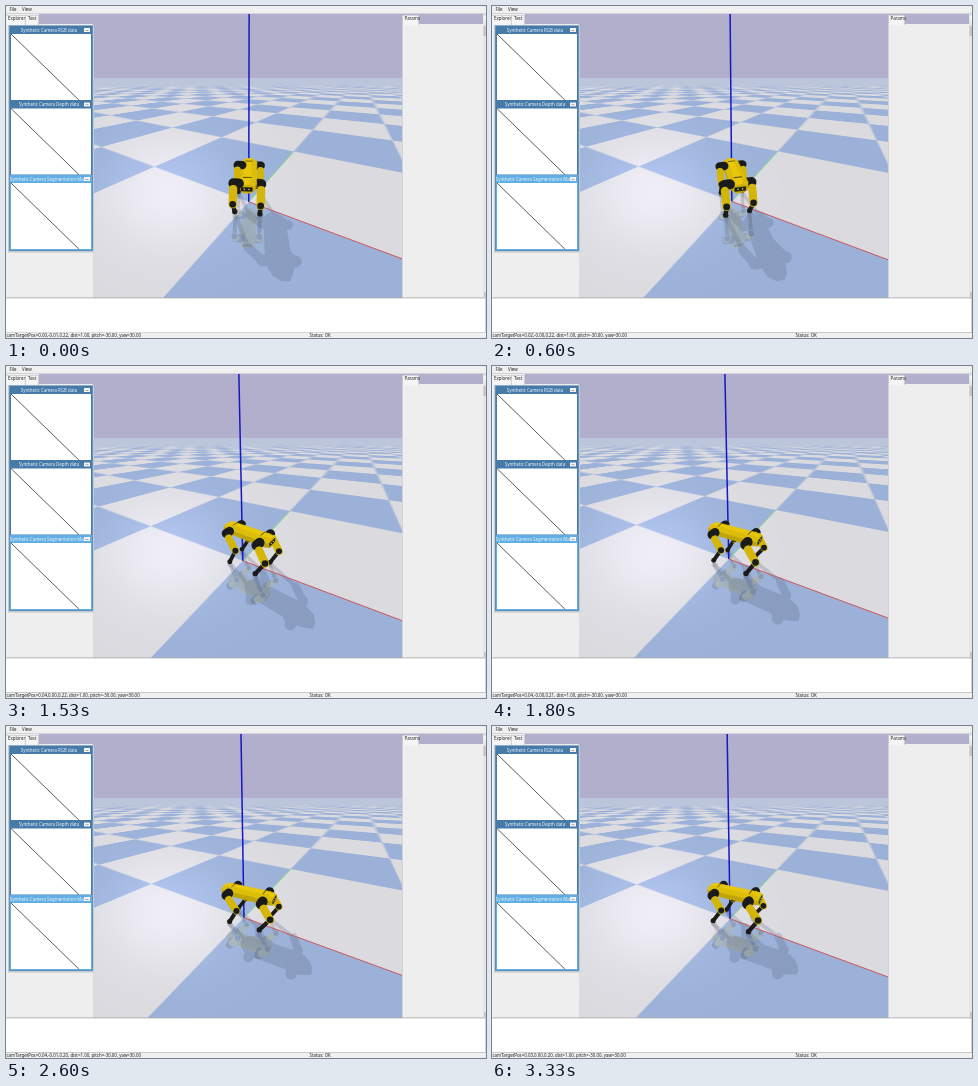
An HTML page with a canvas for the animation above (3390 ms loop, 480 by 332 pixels).

```html
<!DOCTYPE html>
<html lang="en">
<head>
<meta charset="utf-8">
<title>Quadruped simulation</title>
<style>
  html, body { margin: 0; width: 480px; height: 332px; overflow: hidden; background: #f0f0f0; }
  canvas { display: block; }
</style>
</head>
<body>
<canvas id="stage" width="480" height="332"></canvas>
<script>
const stage = document.getElementById('stage');
const ctx = stage.getContext('2d');
const LOOP = 3390;
const VIEW = { x: 87, y: 8, w: 309, h: 284 };
const HORIZON = 72;
const FOCAL = 168.5, CX = 242.3, CY = 167.6;
const COS = Math.cos(Math.PI / 6), SIN = 0.5;
const BLACK = '#1b1b1a';

// time, camera target x, y, z, heading in degrees
const KEYS = [
  [0, 0.001, -0.008, 0.22, -3],
  [600, 0.02, -0.002, 0.22, 11],
  [1130, 0.03, 0.003, 0.22, 42],
  [1530, 0.041, 0.003, 0.22, 54],
  [2070, 0.047, -0.007, 0.2, 68],
  [2600, 0.038, -0.008, 0.2, 65],
  [3330, 0.031, 0.002, 0.2, 66]
];

function poseAt(t) {
  let i = 0;
  while (i < KEYS.length - 2 && t >= KEYS[i + 1][0]) i++;
  const a = KEYS[i], b = KEYS[i + 1];
  const k = Math.min(1, (t - a[0]) / (b[0] - a[0]));
  const [, x, y, z, deg] = a.map((v, n) => v + (b[n] - v) * k);
  return { x, y, z, heading: deg * Math.PI / 180, t };
}

// Ground coordinates relative to the camera target: right, forward, height.
function project(pose, r, f, z) {
  const dz = z - pose.z;
  const depth = 1 + f * COS - dz * SIN;
  const scale = FOCAL / depth;
  return [CX + r * scale, CY + (-dz * COS - f * SIN) * scale, scale];
}

function projectWorld(pose, x, y, z) {
  const dx = x - pose.x, dy = y - pose.y;
  return project(pose, dx * COS + dy * SIN, dy * COS - dx * SIN, z);
}

const floorImage = ctx.createImageData(VIEW.w, VIEW.y + VIEW.h - HORIZON);

// Box-filtered square wave of period 2
function wave(p, w) {
  const tri = v => Math.abs(v / 2 - Math.floor(v / 2) - 0.5);
  return 2 * (tri(p - w / 2) - tri(p + w / 2)) / w;
}

function drawFloor(pose) {
  const { data, width, height } = floorImage;
  let o = 0;
  for (let j = 0; j < height; j++) {
    const py = HORIZON + j + 0.5;
    const v = (py - CY) / FOCAL;
    const drop = Math.max(0.004, SIN + v * COS);
    const depth = (pose.z + 0.5) / drop;
    const f = depth * (COS - SIN * v) - COS;
    const wr = depth / FOCAL, wf = wr / drop;
    const wx = COS * wr + SIN * wf, wy = SIN * wr + COS * wf;
    for (let i = 0; i < width; i++) {
      const px = VIEW.x + i + 0.5;
      const r = (px - CX) / FOCAL * depth;
      const x = pose.x + r * COS - f * SIN;
      const y = pose.y + r * SIN + f * COS;
      const white = 0.5 + 0.5 * wave(x, wx) * wave(y, wy);
      const glow = Math.exp(-(((px - 162) / 66) ** 2) - ((py - 186) / 56) ** 2);
      data[o++] = 156 + 62 * white + 21 * glow;
      data[o++] = 177 + 41 * white + 20 * glow;
      data[o++] = 215 + 8 * white + 24 * glow;
      data[o++] = 255;
    }
  }
  ctx.putImageData(floorImage, VIEW.x, HORIZON);
}

function drawAxis(pose, end, color, width) {
  const a = projectWorld(pose, 0, 0, 0), b = projectWorld(pose, ...end);
  ctx.strokeStyle = color;
  ctx.lineWidth = width;
  ctx.beginPath();
  ctx.moveTo(a[0], a[1]);
  ctx.lineTo(b[0], b[1]);
  ctx.stroke();
}

const yellow = k => `rgb(${240 * k | 0},${207 * k | 0},${10 * k | 0})`;

// along, half width, half height of the body sections
const SECTIONS = [[-0.162, 0.036, 0.022], [-0.135, 0.05, 0.033], [0.125, 0.05, 0.033], [0.16, 0.04, 0.025]];

// map turns (right, forward, height) into a screen point; facing is the culling sign, 0 for none.
function drawRobot(g, pose, map, facing, flat) {
  const s = Math.sin(pose.heading), c = Math.cos(pose.heading);
  const at = (a, b, z) => map(a * s - b * c, -a * c - b * s, z);

  function polygon(points, color) {
    let area = 0;
    points.forEach((p, i) => {
      const q = points[(i + 1) % points.length];
      area += p[0] * q[1] - p[1] * q[0];
    });
    if (facing && area * facing < 0) return;
    g.fillStyle = g.strokeStyle = flat || color;
    g.lineWidth = 0.5;
    g.beginPath();
    points.forEach(p => g.lineTo(p[0], p[1]));
    g.closePath();
    g.fill();
    g.stroke();
  }

  function limb(p, q, size, color) {
    g.strokeStyle = flat || color;
    g.lineCap = 'round';
    g.lineWidth = size * (p[2] + q[2]) / 2;
    g.beginPath();
    g.moveTo(p[0], p[1]);
    g.lineTo(q[0] + 0.01, q[1]);
    g.stroke();
  }

  function leg(front, side) {
    const phase = pose.t / 530 * 2 * Math.PI + (front * side > 0 ? 0 : Math.PI);
    const stride = 0.012 * Math.sin(phase);
    const lift = Math.max(0, Math.cos(phase)) * 0.01;
    const a = front * 0.108, b = side * 0.075;
    const hip = at(a, b, pose.z);
    const thigh = at(a + 0.018, b, pose.z * 0.88);
    const knee = at(a + 0.062 + stride / 2, b, pose.z * 0.55 + lift / 2);
    const foot = at(a + 0.005 + stride, b, 0.01 + lift);
    limb(at(a, side * 0.045, pose.z), hip, 0.054, BLACK);
    limb(knee, foot, 0.024, BLACK);
    limb(foot, foot, 0.032, BLACK);
    limb(thigh, knee, 0.044, yellow(0.88));
    limb(knee, knee, 0.036, BLACK);
  }

  function body() {
    const rings = SECTIONS.map(([a, w, h]) => Array.from({ length: 8 }, (_, k) => {
      const angle = (k + 0.5) * Math.PI / 4;
      return at(a, 1.08 * w * Math.cos(angle), pose.z + 1.08 * h * Math.sin(angle));
    }));
    for (let n = 0; n < 3; n++) {
      for (let k = 0; k < 8; k++) {
        const m = (k + 1) % 8;
        const up = Math.sin((k + 1) * Math.PI / 4);
        polygon([rings[n][m], rings[n + 1][m], rings[n + 1][k], rings[n][k]], yellow(0.8 + 0.17 * up));
      }
    }
    polygon([...rings[0]].reverse(), yellow(0.7));
    polygon(rings[3], yellow(0.85));
    const panel = [[1, -1], [1, 1], [-1, 1], [-1, -1]];
    polygon(panel.map(([b, z]) => at(0.161, b * 0.029, pose.z + z * 0.011)), BLACK);
    if (c > 0.3) {
      for (const b of [-0.012, 0.012]) {
        const eye = at(0.162, b, pose.z);
        limb(eye, eye, 0.008, '#d8c254');
      }
    }
    // Dark seams on the top cover
    for (const a of [-0.1, 0.1]) {
      limb(at(a, -0.02, pose.z + 0.034), at(a, 0.02, pose.z + 0.034), 0.006, '#6d5c08');
    }
  }

  leg(-1, -1);
  leg(1, -1);
  body();
  leg(-1, 1);
  leg(1, 1);
}

const layer = document.createElement('canvas');
layer.width = 480;
layer.height = 332;
const layerCtx = layer.getContext('2d');

function drawGhost(alpha, pose, map, facing, flat) {
  layerCtx.clearRect(0, 0, 480, 332);
  drawRobot(layerCtx, pose, map, facing, flat);
  ctx.globalAlpha = alpha;
  ctx.drawImage(layer, 0, 0);
  ctx.globalAlpha = 1;
}

function drawScene(pose) {
  rect(33, 8, 363, 65, '#b1afcb');
  drawFloor(pose);
  ctx.save();
  ctx.beginPath();
  ctx.rect(VIEW.x, VIEW.y, VIEW.w, VIEW.h);
  ctx.clip();
  drawGhost(0.2, pose, (r, f, z) => project(pose, r + 0.65 * z, f - 1.35 * z, 0), 0, '#44526f');
  drawGhost(0.15, pose, (r, f, z) => project(pose, r, f, -z), -1);
  drawAxis(pose, [1, 0, 0], '#c85860', 1);
  drawAxis(pose, [0, 1, 0], '#78d882', 1);
  drawAxis(pose, [0, 0, 1], '#1717c4', 1.5);
  drawRobot(ctx, pose, (r, f, z) => project(pose, r, f, z), 1);
  ctx.restore();
}

function rect(x, y, w, h, color) {
  ctx.fillStyle = color;
  ctx.fillRect(x, y, w, h);
}

function text(string, x, y, color = '#222', align = 'left') {
  ctx.font = '4.4px "Noto Sans", sans-serif';
  ctx.textAlign = align;
  ctx.fillStyle = color;
  ctx.fillText(string, x, y);
}

function cameraWindow(y, title, header) {
  rect(4, y, 82, 75, header);
  rect(5, y + 8, 80, 66, '#fff');
  ctx.save();
  ctx.beginPath();
  ctx.rect(4, y, 74, 75);
  ctx.clip();
  text(title, 43, y + 5.6, '#eef5fb', 'center');
  ctx.restore();
  rect(78, y + 2, 6, 4, '#f4f4f4');
  rect(79.5, y + 4, 3, 0.6, '#777');
  ctx.strokeStyle = '#333';
  ctx.lineWidth = 0.8;
  ctx.beginPath();
  ctx.moveTo(5, y + 8);
  ctx.lineTo(72.8, y + 74);
  ctx.stroke();
}

function tab(x, w, title) {
  rect(x, 9, w, 10, '#b4b4b4');
  rect(x, 9.5, w - 0.6, 10, '#f5f5f5');
  text(title, x + 2, 14.4);
}

function drawInterface(pose) {
  rect(0, 0, 480, 8, '#f0f0f0');
  rect(0, 7, 480, 1, '#d2d2d8');
  text('File', 3.5, 5.4);
  text('View', 16, 5.4);

  rect(0, 18, 87, 274, '#eeeeee');
  rect(0, 8, 33, 10, '#eeeeee');
  tab(0, 19.5, 'Explorer');
  tab(20, 12.5, 'Test');
  rect(2, 19, 86, 227.5, '#c6c9cd');
  rect(3, 19.5, 84, 225.5, '#5f93bf');
  cameraWindow(20, 'Synthetic Camera RGB data', '#467aa9');
  cameraWindow(94.5, 'Synthetic Camera Depth data', '#467aa9');
  cameraWindow(169, 'Synthetic Camera Segmentation Mask', '#61aee5');

  rect(396, 8, 84, 10, '#b1afcb');
  rect(396, 18, 84, 274, '#eeeeee');
  tab(396.5, 16.5, 'Params');
  rect(396, 8, 0.6, 284, '#c2c2c8');
  rect(477, 8, 3, 284, '#e6e6e6');
  rect(477.5, 20, 2.5, 10, '#c4c4c4');
  rect(478, 10, 2, 5, '#f5f5f5');
  rect(478, 286, 2, 5, '#c4c4c4');

  rect(0, 291.5, 480, 35, '#a5a5a5');
  rect(0, 292.3, 479.5, 33.7, '#fff');
  rect(0, 326.7, 480, 6, '#f0f0f0');
  const target = [pose.x, pose.y, pose.z].map(v => v.toFixed(2)).join(',');
  text(`camTargetPos=${target}, dist=1.00, pitch=-30.00, yaw=30.00`, 0.5, 331);
  text('Status: OK', 303.5, 331);
}

// The picture advances 15 times a second, on ten-millisecond marks.
const stepStart = n => Math.round(n * 20 / 3) * 10;
let shown = -1;

function frame(now) {
  const t = now % LOOP;
  let n = Math.min(50, Math.floor(t * 3 / 200) + 1);
  while (stepStart(n) > t) n--;
  if (n !== shown) {
    shown = n;
    const pose = poseAt(stepStart(n));
    drawScene(pose);
    drawInterface(pose);
  }
  requestAnimationFrame(() => frame(performance.now() - started));
}

const started = performance.now();
frame(0);
</script>
</body>
</html>
```
